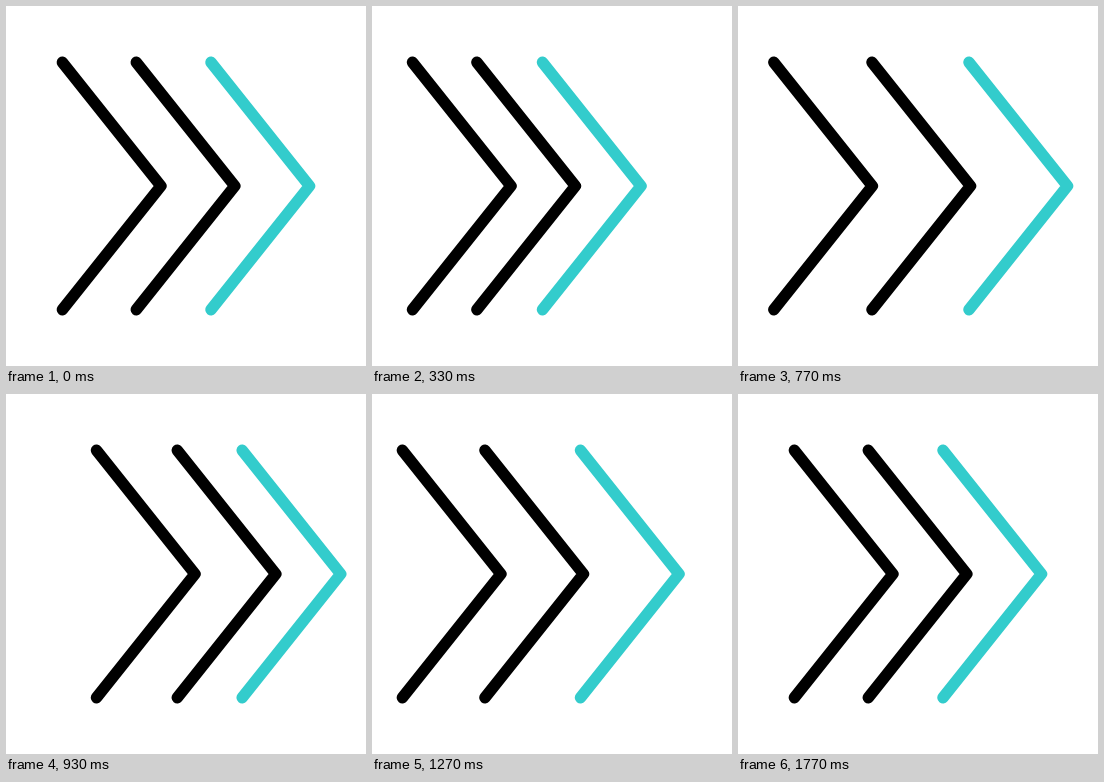
Write an HTML page that moves like this. It is 360 px wide and 360 px high and loops after 2000 ms.

```html
<!DOCTYPE html>
<html lang="en">
<head>
<meta charset="utf-8">
<title>Swinging chevrons</title>
<style>
  html, body { margin: 0; width: 100%; height: 100%; overflow: hidden; background: #fff; }
  svg { display: block; width: 100vw; height: 100vh; }
  path { fill: none; stroke: #000; stroke-width: 11.5; stroke-linecap: round; stroke-linejoin: round; }
  .lead { stroke: #33cccc; }
</style>
</head>
<body>
<svg viewBox="0 0 360 360">
  <path d="M0 56.3 L98.5 180 L0 303.7"/>
  <path d="M0 56.3 L98.5 180 L0 303.7"/>
  <path class="lead" d="M0 56.3 L98.5 180 L0 303.7"/>
</svg>
<script>
const LOOP = 2000;
const TICK = 100 / 3;
// [tick, horizontal offset] of the leading chevron; the others repeat it later.
const SWING = [[0, 0], [15, -46], [26, 41], [34, -26], [42, 33], [49, 0]];
const chevrons = [...document.querySelectorAll('path')].map((node, i) => ({
  node,
  x: [56.4, 130.3, 205][i],
  lag: 4 - 2 * i
}));

const ease = p => (1 - Math.cos(Math.PI * p)) / 2;

function offsetAt(tick) {
  if (tick <= 0) return 0;
  const next = SWING.findIndex(([at]) => tick < at);
  if (next < 0) return 0;
  const [t0, from] = SWING[next - 1];
  const [t1, to] = SWING[next];
  return from + (to - from) * ease((tick - t0) / (t1 - t0));
}

function draw(ms) {
  // The motion steps at 30 per second, on times rounded to 10 ms.
  const tick = Math.floor((ms % LOOP + 3.4) / TICK);
  for (const { node, x, lag } of chevrons) {
    node.setAttribute('transform', `translate(${x + offsetAt(tick - lag)} 0)`);
  }
}

function loop() {
  draw(performance.now());
  requestAnimationFrame(loop);
}
draw(0);
requestAnimationFrame(loop);
</script>
</body>
</html>
```
